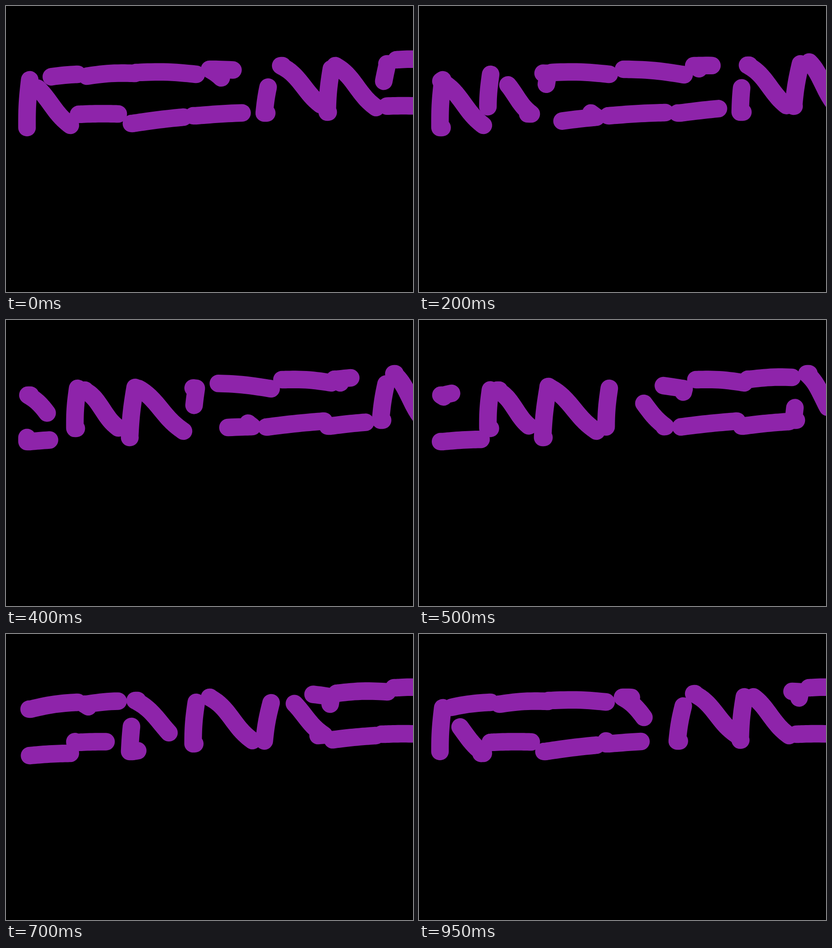
Animation, 892 px wide and 628 px high, one loop 1 s. Source, as an HTML page with a canvas:

```html
<!DOCTYPE html>
<html lang="en">
<head>
<meta charset="utf-8">
<title>Marching truss</title>
<style>
  html, body { margin: 0; width: 100%; height: 100%; overflow: hidden; background: #000; }
  canvas { display: block; }
</style>
</head>
<body>
<canvas width="892" height="628"></canvas>
<script>
const ctx = document.querySelector('canvas').getContext('2d');
const STEP = 50, CYCLE = 20, TRAIL = 9;

// One pen draws the whole truss, panel by panel: down the post, along the bottom,
// up the diagonal, along the top. Each corner is [step at which the pen leaves, x, y].
const corners = [
  [14.9, 52, 162], [25.3, 46, 267], [35.5, 141, 262], [48.7, 48, 165],
  [60.4, 157, 150], [70.5, 151, 238], [79.9, 246, 237], [91, 171, 154],
  [102.5, 283, 148], [112.9, 271, 258], [122.6, 389, 244], [134.7, 283, 146],
  [145.8, 417, 150], [156, 410, 241], [166.7, 540, 234], [178, 446, 139],
  [189.1, 581, 151], [200.6, 566, 235], [209.9, 697, 222], [222.1, 602, 131],
  [232.7, 713, 138], [244.2, 704, 233], [254, 811, 223], [266.3, 720, 130],
  [277.8, 836, 127], [290, 821, 220], [298.6, 915, 220], [311.5, 850, 118],
  [330, 940, 122]
];
const first = corners[0][0], last = corners[corners.length - 1][0];

// Post, bottom, diagonal, top: steps spent on the side and its hand-drawn bend.
const sides = [
  { time: 5, bow: [-2, 0], sway: 0 },
  { time: 5.5, bow: [0, -1], sway: 0 },
  { time: 6.5, bow: [1, -2], sway: 5 },
  { time: 5, bow: [0, -3], sway: 0 }
];

const clamp = v => Math.min(1, Math.max(0, v));
const ease = u => u * u * (3 - 2 * u);
const slide = i => i % 2 * 6;  // the pen creeps right while it rests at a left corner

function penAt(step) {
  const i = corners.findLastIndex(c => c[0] <= step);
  const [t, ax, ay] = corners[i], [next, bx, by] = corners[i + 1];
  const { time, bow, sway } = sides[i % 4];
  const e = ease(clamp((step - t) / time));
  const rest = clamp((step - t - time) / (next - t - time));
  const arc = Math.sin(Math.PI * e);
  const x0 = ax + slide(i);
  return [
    x0 + (bx - x0) * e + bow[0] * arc + slide(i + 1) * rest,
    ay + (by - ay) * e + bow[1] * arc + sway * Math.sin(2 * Math.PI * e)
  ];
}

function drawTrail(head) {
  const tail = Math.max(first, head - TRAIL);
  if (head < tail) return;
  ctx.beginPath();
  for (let k = tail; k < head; k += 0.25) ctx.lineTo(...penAt(k));
  ctx.lineTo(...penAt(head));
  ctx.stroke();
}

function draw(now) {
  const step = Math.floor(now / STEP) % CYCLE;
  ctx.fillStyle = '#000';
  ctx.fillRect(0, 0, 892, 628);
  ctx.strokeStyle = '#8e24aa';
  ctx.lineWidth = 38.6;
  ctx.lineCap = ctx.lineJoin = 'round';
  for (let head = step; head < last; head += CYCLE) drawTrail(head);
}

let start;
function tick(now) {
  start ??= now;
  draw(now - start);
  requestAnimationFrame(tick);
}
draw(0);
requestAnimationFrame(tick);
</script>
</body>
</html>
```
